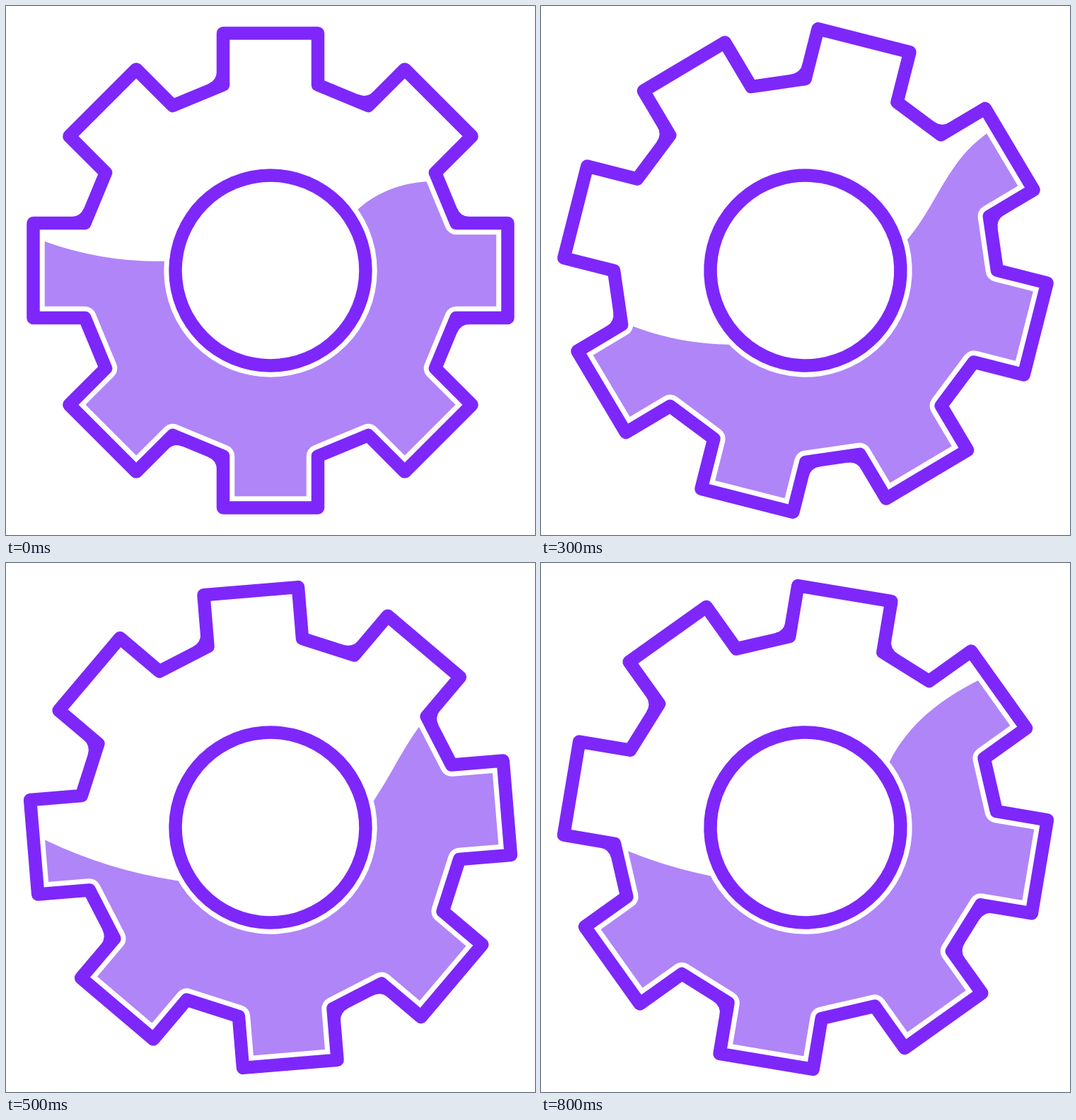
An HTML page with a canvas that plays this animation: 748x748 px, repeating every 900 ms.

```html
<!DOCTYPE html>
<html lang="en">
<head>
<meta charset="utf-8">
<title>Gear</title>
<style>
html, body { margin: 0; width: 100%; height: 100%; overflow: hidden; background: #fff; }
canvas { display: block; width: 748px; height: 748px; }
</style>
</head>
<body>
<canvas id="stage" width="748" height="748"></canvas>
<script>
const ctx = document.getElementById('stage').getContext('2d');
const SIZE = 748, MID = SIZE / 2, STEP = 100, STEPS = 9;
const PURPLE = '#7e27fb', LILAC = '#b085f8', WHITE = '#fff';
const LINE = 18.5, GAP = 7, HALF = 67, TIP = 335.5, ROOT = 262.5, HUB = 134.5;
const RAD = Math.PI / 180, EIGHTH = Math.PI / 4;
const LEFT = 55, RIGHT = 620;

// Liquid surface: heights at the sides, and degrees around the hub above the horizontal
const KEYS = [0, 1, 2, 4, 6, 8];
const leftY = track(333, 361, 442, 387, 396, 375);
const leftHub = track(5, -27, -61, -27, -33, -27);
const rightHub = track(35, 40, 21, 13, 16, 38);
const rightY = track(248, 155, 186, 191, 195, 165);

// Teeth, clockwise from the top, whose left or right root corner is softened
const SOFT_LEFT = [0, 1, 2, 5], SOFT_RIGHT = [2, 4, 6];

const gear = makeGear();

function track(...values) {
  return step => {
    const i = Math.max(1, KEYS.findIndex(k => k >= step));
    const t = (step - KEYS[i - 1]) / (KEYS[i] - KEYS[i - 1]);
    return values[i - 1] + (values[i] - values[i - 1]) * t;
  };
}

function makeGear() {
  const path = new Path2D();
  const tooth = [[-HALF, -ROOT], [-HALF, -TIP], [HALF, -TIP], [HALF, -ROOT]];
  for (let k = 0; k < 8; k++) {
    const cos = Math.cos(k * EIGHTH), sin = Math.sin(k * EIGHTH);
    for (const [x, y] of tooth) path.lineTo(x * cos - y * sin, x * sin + y * cos);
  }
  path.closePath();
  return path;
}

// Steady turn that hesitates once past the middle
function turnAt(step) {
  return -(10.25 * step - (step > 4 ? 1.5 : 0)) * RAD;
}

function hubPoint(side, degrees) {
  const r = HUB + LINE / 2 + GAP, a = degrees * RAD;
  return [MID + side * r * Math.cos(a), MID - r * Math.sin(a)];
}

// Point at t along a-b, pushed sideways by bend
function bow([ax, ay], [bx, by], t, bend) {
  const dx = bx - ax, dy = by - ay, k = bend / Math.hypot(dx, dy);
  return [ax + dx * t + dy * k, ay + dy * t - dx * k];
}

function fillLiquid(step) {
  const a = [LEFT, leftY(step)], b = hubPoint(-1, leftHub(step));
  const c = hubPoint(1, rightHub(step)), d = [RIGHT, rightY(step)];
  const sag = 15 + 45 * Math.exp(-((step - 2) ** 2));
  const swell = 8 + 14 * Math.cos(2 * Math.PI * (step - 8) / STEPS);
  const c1 = bow(c, d, 1 / 3, swell), c2 = bow(c, d, 2 / 3, 16);
  ctx.beginPath();
  ctx.moveTo(0, a[1]);
  ctx.lineTo(...a);
  ctx.quadraticCurveTo(...bow(a, b, 0.5, -sag), ...b);
  ctx.lineTo(...c);
  ctx.bezierCurveTo(...c1, ...c2, ...d);
  ctx.lineTo(...bow(c2, d, 1.5, 0));
  ctx.lineTo(SIZE, d[1] - 35);
  ctx.lineTo(SIZE, SIZE);
  ctx.lineTo(0, SIZE);
  ctx.fillStyle = LILAC;
  ctx.fill();
}

function soften(tooth, side) {
  const x = HALF + LINE / 2, slope = EIGHTH / 2;
  const y = -ROOT + LINE / 2 * (Math.tan(slope) - 1 / Math.cos(slope));
  ctx.save();
  ctx.rotate(tooth * EIGHTH);
  ctx.scale(side, 1);
  ctx.beginPath();
  ctx.moveTo(x - 0.5, y - 13);
  ctx.quadraticCurveTo(x, y, x + 13 * Math.cos(slope), y + 13 * Math.sin(slope));
  ctx.lineTo(x - 7, y + 7);
  ctx.fillStyle = PURPLE;
  ctx.fill();
  ctx.restore();
}

function strokeGear(color, width) {
  ctx.strokeStyle = color;
  ctx.lineWidth = width;
  ctx.stroke(gear);
}

function disc(color, radius) {
  ctx.beginPath();
  ctx.arc(0, 0, radius, 0, 2 * Math.PI);
  ctx.fillStyle = color;
  ctx.fill();
}

function draw(step) {
  const place = () => {
    ctx.setTransform(1, 0, 0, 1, MID, MID);
    ctx.rotate(turnAt(step));
  };
  ctx.setTransform(1, 0, 0, 1, 0, 0);
  ctx.fillStyle = WHITE;
  ctx.fillRect(0, 0, SIZE, SIZE);
  ctx.lineJoin = 'round';

  ctx.save();
  place();
  ctx.clip(gear);
  ctx.setTransform(1, 0, 0, 1, 0, 0);
  fillLiquid(step);
  ctx.restore();

  place();
  strokeGear(WHITE, LINE + 2 * GAP);
  strokeGear(PURPLE, LINE);
  SOFT_LEFT.forEach(tooth => soften(tooth, -1));
  SOFT_RIGHT.forEach(tooth => soften(tooth, 1));

  disc(WHITE, HUB + LINE / 2 + GAP);
  disc(PURPLE, HUB + LINE / 2);
  disc(WHITE, HUB - LINE / 2);
}

const start = performance.now();

function tick() {
  const t = Math.max(0, performance.now() - start);
  draw(Math.floor(t / STEP) % STEPS);
  requestAnimationFrame(tick);
}
tick();
</script>
</body>
</html>
```
